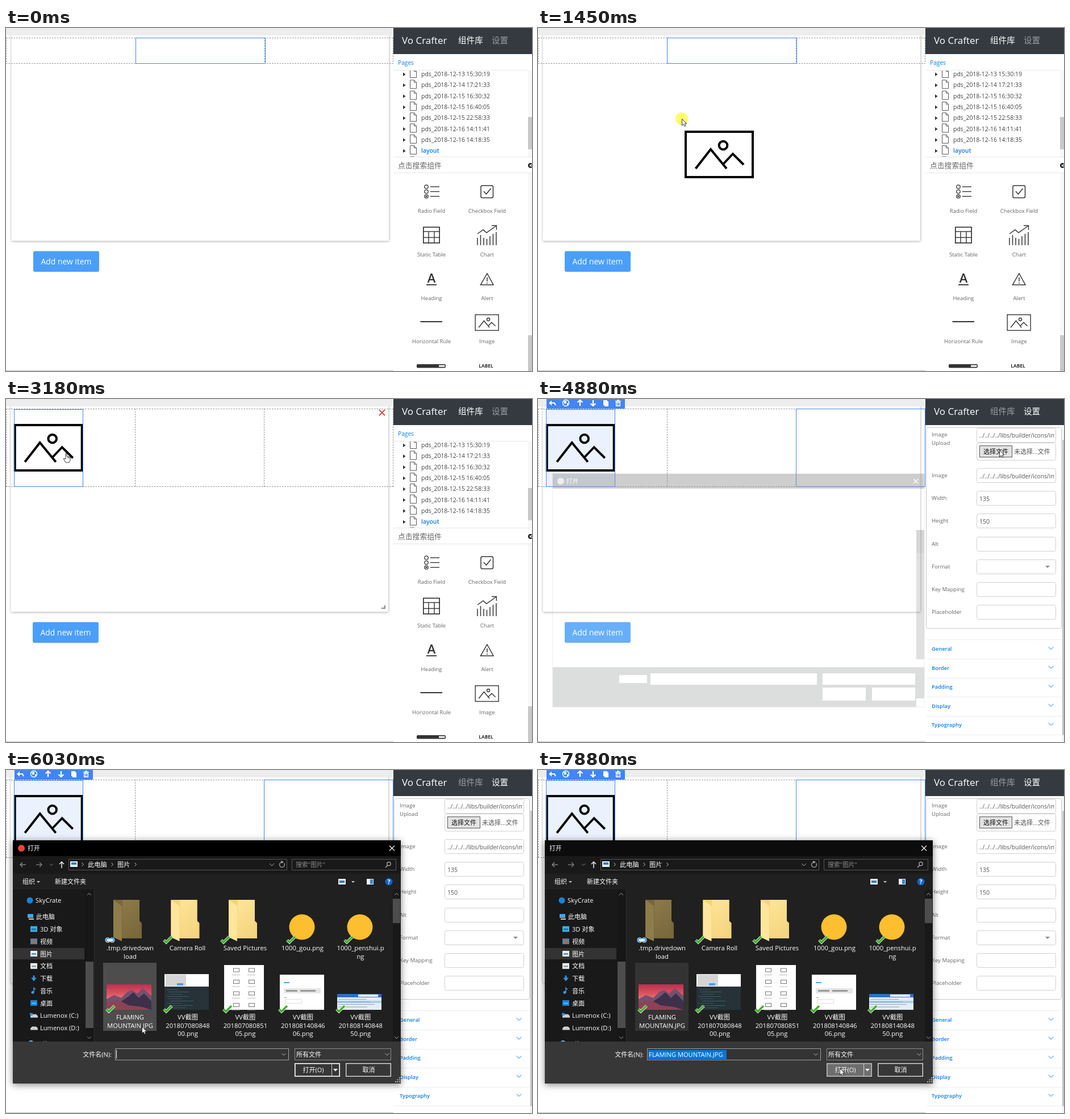
Write an HTML page with a canvas that moves like this. It is 926 by 605 pixels and loops after 7990 ms.

```html
<!DOCTYPE html>
<html lang="zh">
<head>
<meta charset="utf-8">
<title>Page editor</title>
<style>
html, body { margin: 0; width: 100%; height: 100%; overflow: hidden; background: #fff; }
canvas { display: block; }
</style>
</head>
<body>
<canvas id="stage" width="926" height="605"></canvas>
<script>
const c = document.getElementById('stage').getContext('2d');
const LOOP = 7990;
const FONT = '"Open Sans","Noto Sans CJK SC","Noto Sans CJK",sans-serif';
const BLUE = '#4285f4', LINK = '#0d7eec', INK = '#333';

// ---- helpers
function text(s, x, y, size, color, align = 'left', weight = 400) {
  c.font = `${weight} ${size}px ${FONT}`;
  c.textAlign = align;
  c.fillStyle = color;
  c.fillText(s, x, y);
}
function rect(x, y, w, h, color) { c.fillStyle = color; c.fillRect(x, y, w, h); }
function round(x, y, w, h, r, fill, stroke) {
  c.beginPath();
  c.roundRect(x, y, w, h, r);
  if (fill) { c.fillStyle = fill; c.fill(); }
  if (stroke) { c.strokeStyle = stroke; c.lineWidth = 1; c.stroke(); }
}
function frame(x, y, w, h, color, lw = 1) {
  c.strokeStyle = color; c.lineWidth = lw;
  c.strokeRect(x + lw / 2, y + lw / 2, w - lw, h - lw);
}
function trace(p) {
  c.beginPath();
  for (let i = 0; i < p.length; i += 2) c.lineTo(p[i], p[i + 1]);
}
function line(color, lw, ...p) { trace(p); c.strokeStyle = color; c.lineWidth = lw; c.stroke(); }
function poly(color, ...p) { trace(p); c.closePath(); c.fillStyle = color; c.fill(); }
function disc(x, y, r, color) { c.beginPath(); c.arc(x, y, r, 0, 7); c.fillStyle = color; c.fill(); }
function arc(x, y, r, from, to, color, lw) {
  c.beginPath(); c.arc(x, y, r, from, to);
  c.strokeStyle = color; c.lineWidth = lw; c.stroke();
}
function ring(x, y, r, color, lw) { arc(x, y, r, 0, 7, color, lw); }
function dashed(...p) { c.setLineDash([2.5, 2]); line('#8d8d8d', 1, ...p); c.setLineDash([]); }
function at(x, y, scale, draw) { c.save(); c.translate(x, y); c.scale(scale, scale); draw(); c.restore(); }
function clipped(x, y, w, h, draw) {
  c.save(); c.beginPath(); c.rect(x, y, w, h); c.clip(); draw(); c.restore();
}
function chevron(x, y, r, color, dx = 0, dy = 1) {
  if (dx) line(color, 1, x - dx * r / 2, y - r, x + dx * r / 2, y, x - dx * r / 2, y + r);
  else line(color, 1, x - r, y - dy * r / 2, x, y + dy * r / 2, x + r, y - dy * r / 2);
}
function shade(x0, y0, x1, y1, ...colors) {
  const g = c.createLinearGradient(x0, y0, x1, y1);
  colors.forEach((s, i) => g.addColorStop(i / (colors.length - 1), s));
  return g;
}

// ---- pointer path: start, end, number of steps, way points
const moves = [
  [210, 610, 6, [[852, 582], [848, 545], [846, 519]]],
  [750, 1530, 11, [[846, 519], [775, 478], [700, 436], [622, 394], [572, 367], [517, 334],
    [407, 261], [338, 216], [290, 185], [253, 160], [184, 123]]],
  [1610, 2070, 7, [[165, 105], [110, 55], [40, 15], [5, -5], [40, -12], [83, -15]]],
  [2240, 2310, 2, [[82, -15], [81, -16]]],
  [2690, 2920, 4, [[114, 40], [106, 95]]],
  [3490, 4250, 11, [[120, 95], [812, 90]]],
  [5190, 5660, 7, [[790, 110], [262, 493]]],
  [5720, 6200, 7, [[256, 480], [222, 425]]],
  [6350, 7110, 11, [[222, 425], [330, 445], [440, 465], [537, 483], [534, 512], [531, 526]]]
];
function pointer(t) {
  const move = moves.filter(m => m[0] <= t).pop();
  if (!move) return null;
  const [a, b, n, p] = move;
  const step = Math.min(n - 1, Math.floor((t - a) / (b - a) * (n - 1) + 0.1));
  const u = step / (n - 1) * (p.length - 1);
  const i = Math.min(p.length - 2, Math.floor(u)), f = u - i;
  return { x: p[i][0] + (p[i + 1][0] - p[i][0]) * f, y: p[i][1] + (p[i + 1][1] - p[i][1]) * f };
}
function shape(points) {
  trace(points);
  c.closePath();
  c.fillStyle = '#fff'; c.fill();
  c.strokeStyle = '#222'; c.lineWidth = 0.9; c.stroke();
}
function arrow(x, y) {
  at(x, y, 1, () => shape([0.5, 0.5, 0.5, 12, 3.2, 9.6, 5, 13.5, 7, 12.6, 5.3, 8.8, 8.8, 8.8]));
}
function hand(x, y) {
  at(x, y, 1, () => {
    shape([-1, 1, 1, 1, 1, 6, 7, 7.5, 7, 13, 5, 17, -1, 17, -4.5, 11, -4, 9.5, -1, 11]);
    line('#222', 0.8, 3, 7, 3, 10);
    line('#222', 0.8, 5, 7.5, 5, 10);
  });
}

// ---- editor
function picture(x, y, scale = 1, color = '#000') {
  at(x, y, scale, () => {
    frame(0, 0, 122, 84, color, 4);
    line(color, 4, 19.5, 67, 46, 33, 74, 67);
    line(color, 4, 68, 59, 85, 41, 104, 60);
    ring(68, 26, 7.3, color, 4);
  });
}
function toolbar() {
  rect(15, 0, 138, 17, BLUE);
  line('#fff', 2, 31, 11, 29, 7, 22, 7);
  poly('#fff', 19, 7, 24, 2.5, 24, 11.5);
  ring(49, 7, 5.5, '#fff', 1.4);
  poly('#fff', 45, 4, 50, 3, 50, 7, 47, 9);
  poly('#fff', 51, 7, 54, 8, 51, 12);
  for (const [x, d] of [[74, -1], [97, 1]]) {
    line('#fff', 2.4, x, 7 - d * 5, x, 7 + d * 4);
    line('#fff', 2.2, x - 4.5, 7 + d, x, 7 + d * 5, x + 4.5, 7 + d);
  }
  rect(115, 2, 7, 9, '#fff'); rect(117, 4, 7, 9, '#fff');
  rect(136, 3, 10, 1.5, '#fff'); rect(139, 1.5, 4, 2, '#fff');
  frame(137, 5, 8, 8, '#fff', 1.5); rect(140, 5, 1.2, 7, '#fff');
}
function editor(t) {
  const o = t < 750 ? 1 : 0, dropped = t >= 2460, chosen = t >= 3240;
  const bottom = dropped ? 154.5 : 62.5;
  // The open dialog takes the pointer, so hover states stay as they were.
  const cur = pointer(Math.min(t, 4880));
  rect(0, 0, 682, 605, '#fff');
  rect(0, 0, 682, 13, '#ededed');
  clipped(0, 13, 682, 400, () => {
    c.save();
    c.shadowColor = 'rgba(0,0,0,.42)'; c.shadowBlur = 4;
    rect(8.5 + o, 8, 664.5, 367.5, '#fff');
    c.restore();
  });
  if (chosen) rect(14, 18, 122, 136, '#ebf2fe');
  dashed(0, 17.5, 682, 17.5);
  dashed(0, bottom, 682, bottom);
  for (const x of [0.5, 227.5 + o, 454.5 + o, 681.5]) dashed(x, 17, x, bottom);
  if (!dropped) frame(227 + o, 17, 229, 46, BLUE);
  else {
    picture(13.7, 44, 1, chosen ? '#06080d' : '#000');
    if (t >= 2690) frame(14, 18, 122, 137, BLUE);
    if (t >= 2690 && cur.x < 674) {
      line('#f04848', 2, 657, 19, 667, 29);
      line('#f04848', 2, 667, 19, 657, 29);
      line('#888', 2, 661, 369, 667, 369, 667, 364);
    }
    if (t >= 3490 && cur.x > 136) {
      const cell = cur.x < 227 ? 0 : cur.x < 454 ? 1 : 2;
      frame([0, 227, 454][cell], 17, 228, 138, BLUE);
    }
  }
  if (chosen) toolbar();
  round(47 + o, 393.5, 116, 36.5, 3, '#4a9ffb');
  text('Add new item', 105 + o, 417, 13.9, '#fff', 'center');
  rect(0, 604, 682, 1, '#bdbdbd');
}

// ---- side panel
function header(settings) {
  rect(682, 0, 244, 605, '#fff');
  rect(682, 0, 244, 46, '#343a40');
  text('Vo Crafter', 697, 28, 17, '#fff');
  text('组件库', 796, 26.5, 14.6, settings ? '#9a9da0' : '#fff');
  text('设置', 855, 26.5, 14.6, settings ? '#fff' : '#9a9da0');
}
const pages = ['13 15:30:19', '14 17:21:33', '15 16:30:32', '15 16:40:05', '15 22:58:33', '16 14:11:41', '16 14:18:35'];
function palette(t) {
  header(false);
  text('Pages', 690, 65, 10.2, LINK);
  rect(682, 74, 237, 1, '#e8e8e8');
  clipped(682, 75, 244, 153, () => {
    for (let i = 0; i < 9; i++) {
      const y = 81 + i * 19.3;
      poly('#333', 699, y - 2.5, 703.5, y + 0.8, 699, y + 4);
      line('#555', 1, 718.5, y - 8.5, 711.5, y - 8.5, 711.5, y + 6.5, 722.5, y + 6.5, 722.5, y - 4.5, 718.5, y - 8.5, 718.5, y - 4.5, 722.5, y - 4.5);
      if (i < 7) text('pds_2018-12-' + pages[i], 731, y + 4, 10.45, '#444');
      else if (i < 8) text('layout', 731, y + 3.5, 10.4, t < 750 ? '#007bff' : '#1479d8', 'left', 600);
    }
    rect(919, 75, 7, 153, '#f7f7f7');
    rect(919, 157, 7, 57, '#c8c8c8');
  });
  rect(682, 227, 244, 1, '#e6e6e6');
  text('点击搜索组件', 690, 247, 12.8, '#666');
  disc(923.5, 242.5, 4.5, '#222');
  line('#fff', 1.2, 922, 241, 926, 245);
  line('#fff', 1.2, 926, 240, 922, 244);
  rect(682, 255, 244, 1, '#e6e6e6');
  rect(919, 256, 7, 349, '#f7f7f7');
  rect(919, 542, 7, 63, '#c8c8c8');

  const labels = ['Radio Field', 'Checkbox Field', 'Static Table', 'Chart', 'Heading', 'Alert', 'Horizontal Rule', 'Image'];
  labels.forEach((s, i) => text(s, i % 2 ? 847 : 749, 326 + (i >> 1) * 76.8, 9.5, '#666', 'center'));
  for (const y of [280, 288.5, 297]) {
    ring(740, y, 3.2, INK, 1.3);
    line(INK, 1.4, 747, y, 763, y);
  }
  disc(740, 297, 1.6, INK);
  c.lineWidth = 1.5; c.strokeStyle = INK;
  c.beginPath(); c.roundRect(836, 278, 21.5, 21.5, 2.5); c.stroke();
  line(INK, 1.5, 841, 288, 845.5, 293, 853.5, 283);
  frame(734, 350.5, 30, 29.5, INK, 1.7);
  for (const x of [744, 754]) line(INK, 1.4, x, 359, x, 380);
  for (const y of [359, 369.5]) line(INK, 1.4, 734, y, 764, y);
  for (let i = 0; i < 7; i++) line(INK, 1.5, 830 + i * 5.5, 383, 830 + i * 5.5, [370, 365, 370, 372, 367, 363, 360][i]);
  line(INK, 1.4, 830, 363, 840, 356, 846, 361, 863, 349);
  line(INK, 1.4, 855, 348.5, 863.5, 348.5, 863.5, 356);
  text('A', 749, 449, 22, INK, 'center', 600);
  rect(740, 452, 18, 1.8, INK);
  trace([847, 433, 858, 453, 835.5, 453]); c.closePath();
  c.lineWidth = 1.5; c.stroke();
  line(INK, 1.5, 847, 440, 847, 447);
  disc(847, 450, 1, INK);
  rect(729.5, 517, 38.5, 2, INK);
  picture(825.5, 505, 0.347, INK);
  round(723, 593, 51, 6.5, 2, INK);
  rect(762, 594.7, 10.5, 3, '#fff');
  text('LABEL', 845, 599, 8.4, INK, 'center', 700);
}
function field(y, h = 26) { round(772.5, y + 0.5, 139, h, 3, '#fff', '#ced0d3'); }
function settings(t) {
  header(true);
  clipped(682, 46, 244, 559, () => {
    round(683.5, 50.5, 238, 354, 3, null, '#c9c9c9');
    text('Image', 693, 66, 9.6, '#666');
    text('Upload', 693, 80.5, 9.6, '#666');
    field(51, 25);
    field(77, 30.5);
    rect(777, 82, 58, 21, t >= 4330 ? '#e3e3e3' : '#dcdcdc');
    frame(777, 82, 58, 21, t >= 4330 ? '#555' : '#777');
    text('选择文件', 784, 96.5, 11, '#111');
    text('未选择...文件', 838, 96.5, 11, '#555');
    ['Image', 'Width', 'Height', 'Alt', 'Format', 'Key Mapping', 'Placeholder'].forEach((s, i) => {
      const y = 122 + i * 40.2;
      text(s, 693, y + 16, 9.6, '#666');
      field(Math.round(y), 25);
    });
    clipped(773, 50, 136, 110, () => {
      for (const y of [68, 140]) text('../../../../libs/builder/icons/image', 777, y, 10.2, '#555');
    });
    text('135', 777, 180, 10.6, '#555');
    text('150', 777, 220, 10.6, '#555');
    poly('#888', 893, 294, 901, 294, 897, 298);
    rect(684, 424, 238, 1, '#ededed');
    ['General', 'Border', 'Padding', 'Display', 'Typography'].forEach((s, i) => {
      const y = 444 + i * 33.5;
      text(s, 693, y, 9.4, LINK, 'left', 600);
      chevron(903, y - 4.5, 4.3, LINK);
      rect(684, Math.round(y + 14), 238, 1, '#ededed');
    });
    rect(922, 46, 4, 559, '#f4f4f4');
    rect(923, 72, 3, 521, '#c4c4c4');
  });
}

// ---- file dialog
function paleDialog() {
  rect(26, 132, 654, 411, 'rgba(255,255,255,.16)');
  frame(25, 131, 656, 413, 'rgba(0,0,0,.06)');
  rect(26, 132, 654, 26, 'rgba(120,120,120,.36)');
  rect(666, 231, 14, 228, 'rgba(0,0,0,.12)');
  rect(666, 231, 14, 41, 'rgba(0,0,0,.04)');
  rect(26, 473, 654, 70, '#dcdedd');
  for (const [x, y, w, h] of [[143, 487, 49, 14], [198, 484, 293, 20], [501, 484, 163, 20], [501, 509, 76, 23], [588, 509, 76, 23], [666, 528, 14, 15]])
    rect(x, y, w, h, '#fff');
  disc(40, 145, 6, '#eee');
  text('打开', 50, 149, 10.5, '#fff');
  line('#fff', 1.2, 661, 141, 669, 149);
  line('#fff', 1.2, 669, 141, 661, 149);
}
function folder(x, light, dark) {
  poly(dark, x, 229, x + 46, 229, x + 46, 266, x + 50, 270, x + 50, 297, x + 18, 297, x, 294);
  poly(shade(x, 229, x + 46, 297, light, dark), x + 16, 229, x + 46, 229, x + 46, 294, x + 16, 297);
  poly(light, x, 229, x + 15, 240, x + 15, 302, x, 295);
}
function photo() {
  rect(177, 378, 79, 45, shade(0, 378, 0, 412, '#b8304f', '#df5560', '#e99a98'));
  poly('#75506f', 177, 404, 190, 397, 203, 402, 214, 391, 222, 388, 231, 394, 241, 385, 256, 398, 256, 423, 177, 423);
  poly('#3d3049', 200, 410, 215, 400, 224, 392, 234, 402, 243, 394, 256, 408, 256, 423, 190, 423);
  poly('#8d4256', 177, 410, 198, 406, 216, 415, 240, 418, 256, 423, 177, 423);
}
function thumbs() {
  photo();
  rect(279, 360, 78, 63, '#263238');
  rect(279, 360, 78, 22, '#fff');
  rect(281, 361, 36, 20, '#d5d5d5');
  rect(301, 376, 11, 4, '#4a9ffb');
  for (let i = 0; i < 9; i++) rect(283 + i % 3 * 3, 387 + i * 4, 20 + i * 17 % 32, 1, i % 2 ? '#3a5f68' : '#41525a');
  rect(384, 344, 70, 79, '#fff');
  for (let i = 0; i < 8; i++) {
    const x = i % 2 ? 432 : 405, y = 353 + (i >> 1) * 20.5;
    frame(x - 5, y - 3.5, 11, 7, '#777');
    rect(x - 7, y + 8, 14, 1, '#bbb');
  }
  rect(482, 361, 78, 62, '#fff');
  rect(489, 374, 10, 2, '#5b9de8');
  rect(489, 385, 65, 9, '#e6e6e6');
  rect(493, 388, 20, 3, '#999'); rect(518, 388, 27, 3, '#999');
  rect(490, 401, 4, 1, '#999'); frame(491, 404, 30, 8, '#ddd');
  rect(583, 395, 78, 28, '#e4edf7');
  rect(583, 395, 78, 6, '#2e6fc0');
  rect(620, 396, 35, 4, '#fff');
  rect(583, 407, 78, 4, '#a9cdf3');
  for (let i = 0; i < 4; i++) rect(585, 404 + i * 4.5, 50 + i * 7 % 20, 1, '#8aa5c4');
}
function tick(x, y) {
  line('#e9f7e4', 5, x - 7, y, x - 3, y + 4, x + 7, y - 6);
  line('#3fae2a', 3.2, x - 7, y, x - 3, y + 4, x + 7, y - 6);
}
function sync(x, y) {
  for (const d of [-1, 1]) {
    disc(x + d * 4, y, 4.5, '#e8f3fb');
    arc(x + d * 4, y, 2.8, d < 0 ? 1 : 4, d < 0 ? 5.5 : 8.5, '#2b8be0', 1.8);
  }
}
function sidebar() {
  rect(12, 211, 143, 268, '#191919');
  rect(12, 314, 126, 20, '#333');
  rect(139, 211, 15, 268, '#171717');
  rect(140, 338, 14, 117, '#4d4d4d');
  chevron(146.5, 219, 3.5, '#aaa', 0, -1);
  chevron(146.5, 472, 3.5, '#aaa');
  disc(42, 230, 5.5, '#1683d8');
  text('SkyCrate', 52, 234, 11.2, '#fff');
  rect(38, 254, 10, 7, '#4aa3e0'); rect(40, 262, 9, 2, '#ccc');
  text('此电脑', 53, 263, 11, '#fff');
  const names = ['3D 对象', '视频', '图片', '文档', '下载', '音乐', '桌面', 'Lumenox (C:)', 'Lumenox (D:)'];
  names.forEach((s, i) => {
    const y = 280.5 + i * 21.75;
    text(s, 60, y + 4.5, 11.1, '#fff');
    if (i === 4) { line('#2b95e8', 3, 49, y - 5, 49, y); poly('#2b95e8', 44, y - 1, 54, y - 1, 49, y + 5); }
    else if (i === 5) { disc(47, y + 3, 2.5, '#3a9be8'); line('#3a9be8', 1.5, 49, y + 3, 49, y - 5, 52, y - 2); }
    else if (i > 6) { poly('#cfcfcf', 43, y + 1, 46, y - 2, 53, y - 2, 56, y + 1, 56, y + 4, 43, y + 4); if (i === 7) rect(42, y - 4, 5, 4, '#2b95e8'); }
    else {
      rect(43, y - 5, 12, 10, ['#3db2e5', '#5c7fa8', '#e8eef2', '#f2f2f2', '', '', '#1683d8'][i]);
      rect(45, y - 1, 8, 3, ['#1577b5', '#c06a3a', '#4a9fcf', '#8aa2b8', '', '', '#4ab0f0'][i]);
    }
  });
  disc(44, 482, 5, '#7db7dd');
  text('网络', 53, 488, 11, '#fff');
}
function caption(lines, x, y) { lines.forEach((s, i) => text(s, x, y + i * 14.5, 11.3, '#fff', 'center')); }
function dialog(t, cur) {
  const loaded = t >= 5180, picked = t >= 6350, away = t >= 7830;
  c.save();
  c.shadowColor = 'rgba(0,0,0,.5)'; c.shadowBlur = 12; c.shadowOffsetY = 2;
  rect(12, 124, 683, 429, '#202020');
  c.restore();
  rect(12, 124, 683, 28, away ? '#0c0c0c' : '#000');
  if (!away) disc(27, 138, 6, '#e0483a');
  text('打开', away ? 20 : 38, 142, 10.8, '#fff');
  line('#fff', 1.1, 675, 133.5, 684, 142.5);
  line('#fff', 1.1, 684, 133.5, 675, 142.5);

  rect(12, 152, 683, 31, '#191919');
  for (const [x, d, col] of [[30, -1, '#999'], [58, 1, '#888']]) {
    line(col, 1.2, x - 5, 167, x + 5, 167);
    line(col, 1.2, x + d, 163, x + d * 5, 167, x + d, 171);
  }
  chevron(80, 167, 3, '#888');
  line('#fff', 1.4, 98, 173, 98, 162);
  line('#fff', 1.4, 94, 166, 98, 162, 102, 166);
  frame(110, 157, 385, 20, '#555');
  rect(113, 161, 13, 10, '#e6eef5'); rect(115, 163, 9, 4, '#2f7fc0');
  chevron(135, 166.5, 3, '#ccc', 1);
  text('此电脑', 144, 170.5, 11.2, '#fff');
  chevron(187, 166.5, 3, '#ccc', 1);
  text('图片', 196, 170.5, 11.2, '#fff');
  if (loaded) {
    chevron(228, 166.5, 3, '#ccc', 1);
    chevron(468, 167, 4, '#aaa');
    arc(486, 167, 4.5, -0.6, 4.5, '#aaa', 1.2);
    poly('#aaa', 484, 160, 489, 162, 485, 165);
    frame(503, 157, 184, 20, '#555');
    text('搜索"图片"', 510, 171, 10.8, '#8a8a8a');
    ring(674, 165.5, 3.2, '#bbb', 1.2);
    line('#bbb', 1.3, 672, 168, 668, 172);
    text('组织', 29, 201, 11, '#fff');
    poly('#ccc', 54, 196, 60, 196, 57, 199);
    text('新建文件夹', 86, 201, 11, '#fff');
    rect(585, 192, 13, 10, '#e6eef5'); rect(587, 195, 9, 4, '#2f7fc0');
    poly('#ccc', 608, 196, 614, 196, 611, 199);
  } else {
    rect(459, 158, 35, 18, '#fff');
    rect(502, 154, 185, 24, '#fff');
    rect(497, 166, 5, 1, '#999'); rect(688, 166, 6, 1, '#999');
  }
  rect(635, 192, 12, 10, '#f0f0f0'); rect(641, 193, 5, 8, '#2b8be0');
  disc(674, 197, 6.5, '#0a66c8');
  text('?', 674, 201, 10.5, '#fff', 'center', 700);

  clipped(12, 211, 683, 268, () => {
    sidebar();
    rect(155, 211, 1, 268, '#2e2e2e');
    rect(681, 211, 13, 268, '#191919');
    rect(681, 227, 13, 43, '#4d4d4d');
    chevron(687.5, 219, 3.5, '#aaa', 0, -1);
    chevron(687.5, 472, 3.5, '#aaa');
    const over = cur.x > 171 && cur.x < 265 && cur.y > 340 && cur.y < 460;
    if (away) rect(171, 340, 94, 120, '#333');
    else if (picked) { rect(171, 340, 94, 120, '#777'); if (over) frame(171, 340, 94, 120, '#999'); }
    else if (loaded && over) rect(171, 340, 94, 120, '#4d4d4d');
    folder(189, '#8f7c4b', '#78673b');
    folder(290.5, '#ffe69c', '#f3d47c');
    folder(392, '#ffe69c', '#f3d47c');
    disc(521, 277, 22.5, '#fdbf30');
    disc(623, 277, 22.5, '#fdbf30');
    thumbs();
    caption(['.tmp.drivedown', 'load'], 218.5, 318);
    caption(['Camera Roll'], 319.5, 318);
    caption(['Saved Pictures'], 421, 318);
    caption(['1000_gou.png'], 522, 318);
    caption(['1000_penshui.p', 'ng'], 624, 318);
    caption(['FLAMING', 'MOUNTAIN.JPG'], 218.5, 440);
    [['070808', '48', '00'], ['070808', '51', '05'], ['081408', '46', '06'], ['081408', '48', '50']].forEach(([day, min, sec], i) =>
      caption(['VV截图', '2018' + day + min, sec + '.png'], 320 + i * 101.4, 440));
    if (loaded) {
      for (const x of [285, 386, 502, 603]) tick(x, 300);
      for (const x of [184, 285, 390, 488, 589]) tick(x, 422);
      sync(183, 300);
    }
  });

  rect(12, 479, 683, 74, '#373737');
  text('文件名(N):', 186, 506, 11, '#fff', 'right');
  rect(192, 491, 306, 21, '#333'); frame(192, 491, 306, 21, '#a0a0a0');
  if (away) rect(194, 494, 138, 16, '#0078d7');
  if (picked) text('FLAMING MOUNTAIN.JPG', 195, 506, 11.1, '#fff');
  else rect(194, 494, 1, 15, '#fff');
  chevron(489, 501.5, 3.5, '#bbb');
  const onType = cur.x > 508 && cur.x < 678 && cur.y > 491 && cur.y < 512;
  frame(508, 491, 170, 21, onType ? '#eee' : '#8c8c8c');
  text('所有文件', 511, 506, 11, '#fff');
  chevron(671, 501.5, 3.5, '#bbb');
  if (t >= 7110) rect(508, 517, 80, 24, t < 7180 ? '#4d4d4d' : t < 7340 ? '#5d5d5d' : '#6e6e6e');
  frame(508, 517, 80, 24, t >= 7180 ? '#bbb' : '#fff', 1.6);
  rect(573, 518, 1, 22, '#ccc');
  text('打开(O)', 541, 533, 11, '#fff', 'center');
  poly('#fff', 576, 527, 584, 527, 580, 531.5);
  frame(598, 517, 80, 24, '#ddd', 1.4);
  text('取消', 638.5, 533, 11, '#fff', 'center');
  for (let i = 0; i < 3; i++) for (let j = 0; j <= i; j++) rect(692 - j * 3.5, 542 + i * 3.5, 2, 2, '#bbb');
}
function dialogLayer(t, cur) {
  const step = Math.min(3, Math.floor((t - 4880) / 76));
  if (step < 1) return paleDialog();
  c.save();
  c.globalAlpha = [0, 0.55, 0.9, 1][step];
  const s = [0, 0.975, 0.993, 1][step];
  c.translate(353.5, 338); c.scale(s, s); c.translate(-353.5, -338);
  dialog(t, cur);
  c.restore();
}

// ---- main
function draw(t) {
  const cur = pointer(t);
  editor(t);
  if (t < 3240) palette(t); else settings(t);
  if (t >= 4880) dialogLayer(t, cur);
  if (!cur) return;
  if (t >= 750 && t < 2460) {
    picture(cur.x + 5, cur.y + 21);
    disc(cur.x, cur.y, 11, 'rgba(255,250,70,.8)');
  }
  if (t >= 2690 && t < 3490) hand(cur.x, cur.y);
  else if (t < 2460 || t >= 3490) arrow(cur.x, cur.y);
}
const begin = performance.now();
function loop() {
  draw((performance.now() - begin) % LOOP);
  requestAnimationFrame(loop);
}
loop();
</script>
</body>
</html>
```
